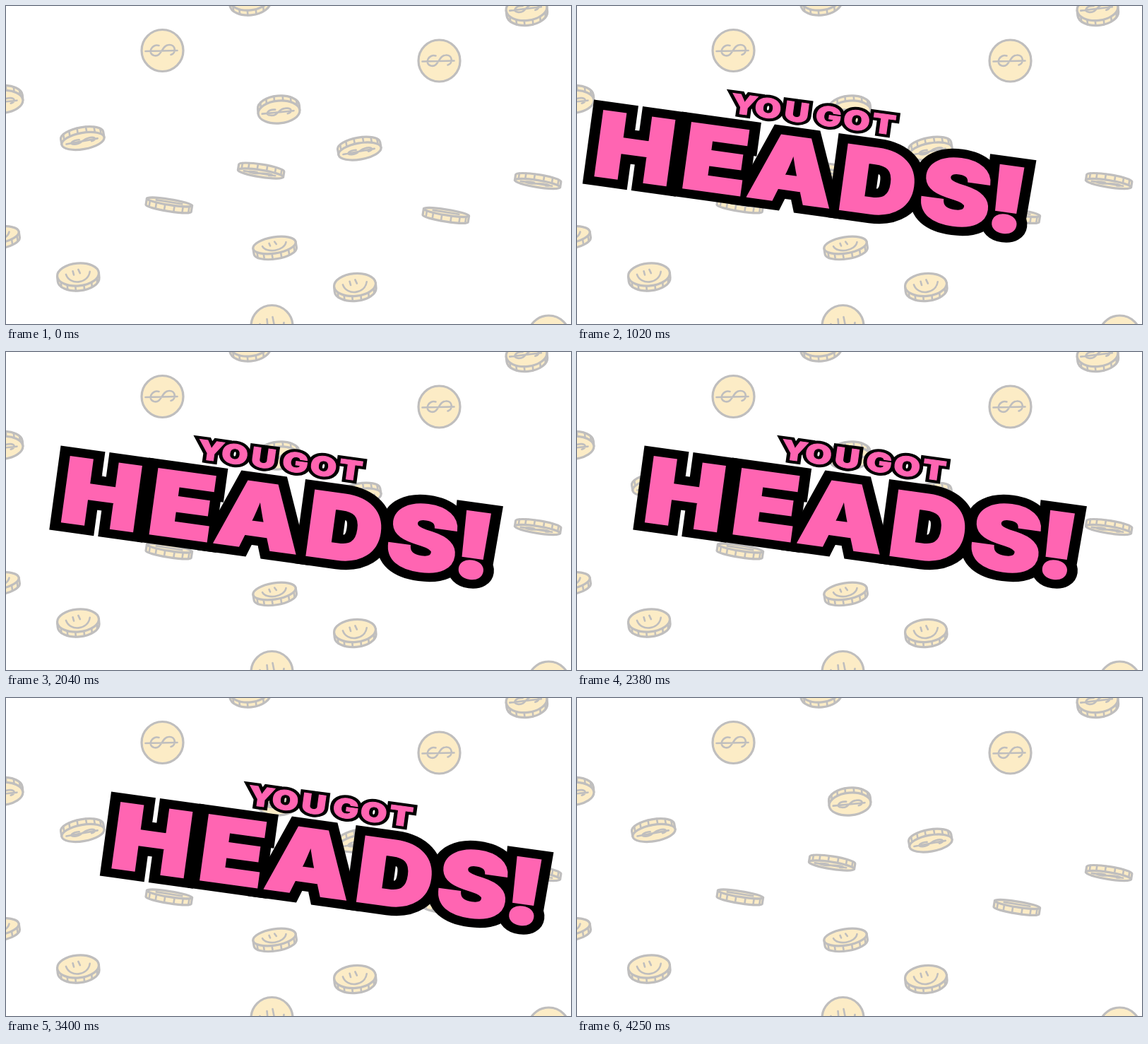
These frames come from a looping animation (800 by 450 pixels, 5100 ms). An HTML page:

```html
<!DOCTYPE html>
<html lang="en">
<head>
<meta charset="utf-8">
<title>You got heads!</title>
<style>
  html, body { margin: 0; width: 100%; height: 100%; overflow: hidden; background: #fff; }
  svg { display: block; width: 100%; height: 100%; }
  .coin { fill: #fcecc6; stroke: #bfbebe; stroke-width: 3.2; stroke-linejoin: round; stroke-linecap: round; }
  .coin path, .coin ellipse { vector-effect: non-scaling-stroke; }
  .coin .mark { fill: none; stroke-width: 2.6; }
  text {
    font-family: Inter, "Open Sans", "Noto Sans", sans-serif;
    font-weight: 900;
    text-anchor: middle;
    text-rendering: geometricPrecision;
    fill: #ff65b2;
    stroke: #ff65b2;
  }
  .edge { fill: #000; stroke: #000; stroke-miterlimit: 3; }
</style>
</head>
<body>
<svg viewBox="0 0 800 450" role="img" aria-label="You got heads!">
  <g id="coins"></g>
  <g id="heads"></g>
  <g id="you"></g>
</svg>
<script>
const STEP = 170, LOOP = 5100, DRIFT = 8.92, TILT = 7.8;
const byId = id => document.getElementById(id);

const MARKS = {
  dollar: "M-24 1L21 0M-5 -7C-15 -10 -22 4 -12 7C-1 10 -1 -8 9 -8C19 -9 20 4 12 6",
  smile: "M-17 -3C-13 27 13 27 17 -5M-7 -10L-6 0M1 -13L3 -3",
  line: "M-19 -1L18 0"
};

// A coin is a face plus a rim that reaches `depth` below it (above when negative).
function coin({ x, y, rx, ry, tilt, depth, mark }) {
  let rim = "";
  if (depth) {
    const sweep = depth > 0 ? 0 : 1, side = Math.sign(depth);
    let ticks = "";
    for (let a = 28; a < 170; a += 24) {
      const r = a * Math.PI / 180;
      ticks += `M${rx * Math.cos(r)} ${side * ry * Math.sin(r)}v${depth}`;
    }
    rim = `<path d="M${-rx} 0V${depth}A${rx} ${ry} 0 0 ${sweep} ${rx} ${depth}V0Z"/>
      <path class="mark" d="${ticks}"/>`;
  }
  return `<g class="coin" transform="translate(${x} ${y}) rotate(${tilt})">${rim}
    <ellipse rx="${rx}" ry="${ry}"/>
    <path class="mark" transform="scale(1 ${ry / rx})" d="${MARKS[mark]}"/></g>`;
}

// `next` is the side on which the coin's twin lies.
const coins = [
  { x: 345, y: -11, rx: 29, ry: 17, tilt: -6, depth: 7, mark: "dollar", next: 1 },
  { x: 221.5, y: 63, rx: 29.5, ry: 29.5, tilt: 0, depth: 0, mark: "dollar", next: 1 },
  { x: 386.5, y: 150, rx: 29.5, ry: 16, tilt: -5, depth: -7, mark: "dollar", next: -1 },
  { x: 109, y: 191, rx: 30.5, ry: 11.5, tilt: -10, depth: -8, mark: "dollar", next: 1 },
  { x: 360.5, y: 237, rx: 32.5, ry: 5, tilt: 9, depth: -8, mark: "dollar", next: 1 },
  { x: 231.5, y: 277.5, rx: 32.5, ry: 4, tilt: 9, depth: 9, mark: "line", next: 1 },
  { x: 380, y: 338.5, rx: 30.5, ry: 11.5, tilt: -9, depth: 8, mark: "smile", next: -1 },
  { x: 102, y: 380, rx: 29.5, ry: 16, tilt: -5, depth: 7, mark: "smile", next: 1 },
  { x: 376.5, y: 453, rx: 29.5, ry: 29.5, tilt: 0, depth: 0, mark: "smile", next: 1 }
];
const twin = c => ({ ...c, x: c.x + 392 * c.next, y: c.y + 14.5 * c.next });
byId("coins").innerHTML = coins.map(c => coin(c) + coin(twin(c))).join("");

const words = [
  { id: "heads", text: "HEADS!", x: 51, y: 239.6, size: 126.5, wide: 1.2, edge: 28, fat: 3,
    at: "43.3 139.5 230.8 333 426 487.2", enter: 35, leave: 486 },
  { id: "you", text: "YOU GOT", x: 459.5, y: 180.5, size: 38, wide: 1.28, edge: 9, fat: 1,
    at: "-156 -129.3 -97.3 -80 -61.7 -30.5 0", enter: 16.4, leave: 230 }
];
for (const w of words) {
  const line = (cls, stroke) =>
    `<text class="${cls}" x="${w.at}" font-size="${w.size}" stroke-width="${stroke}">${w.text}</text>`;
  byId(w.id).innerHTML =
    `<g transform="translate(${w.x} ${w.y}) rotate(${TILT}) scale(${w.wide} 1)">
      ${line("edge", w.edge)}${line("face", w.fat)}</g>`;
}

// Rush in, drift steadily, rush out.
function offset(k, w) {
  return DRIFT * (k - 9)
    - w.enter * Math.max(0, 6 - k) ** 4
    + w.leave * Math.max(0, k - 23) ** 4;
}

function draw(ms) {
  const k = Math.floor((ms % LOOP) / STEP);
  for (const w of words) {
    byId(w.id).setAttribute("transform", `translate(${offset(k, w).toFixed(2)} 0)`);
  }
}

let start;
function tick(now) {
  start ??= now;
  draw(now - start);
  requestAnimationFrame(tick);
}
draw(0);
requestAnimationFrame(tick);
</script>
</body>
</html>
```
